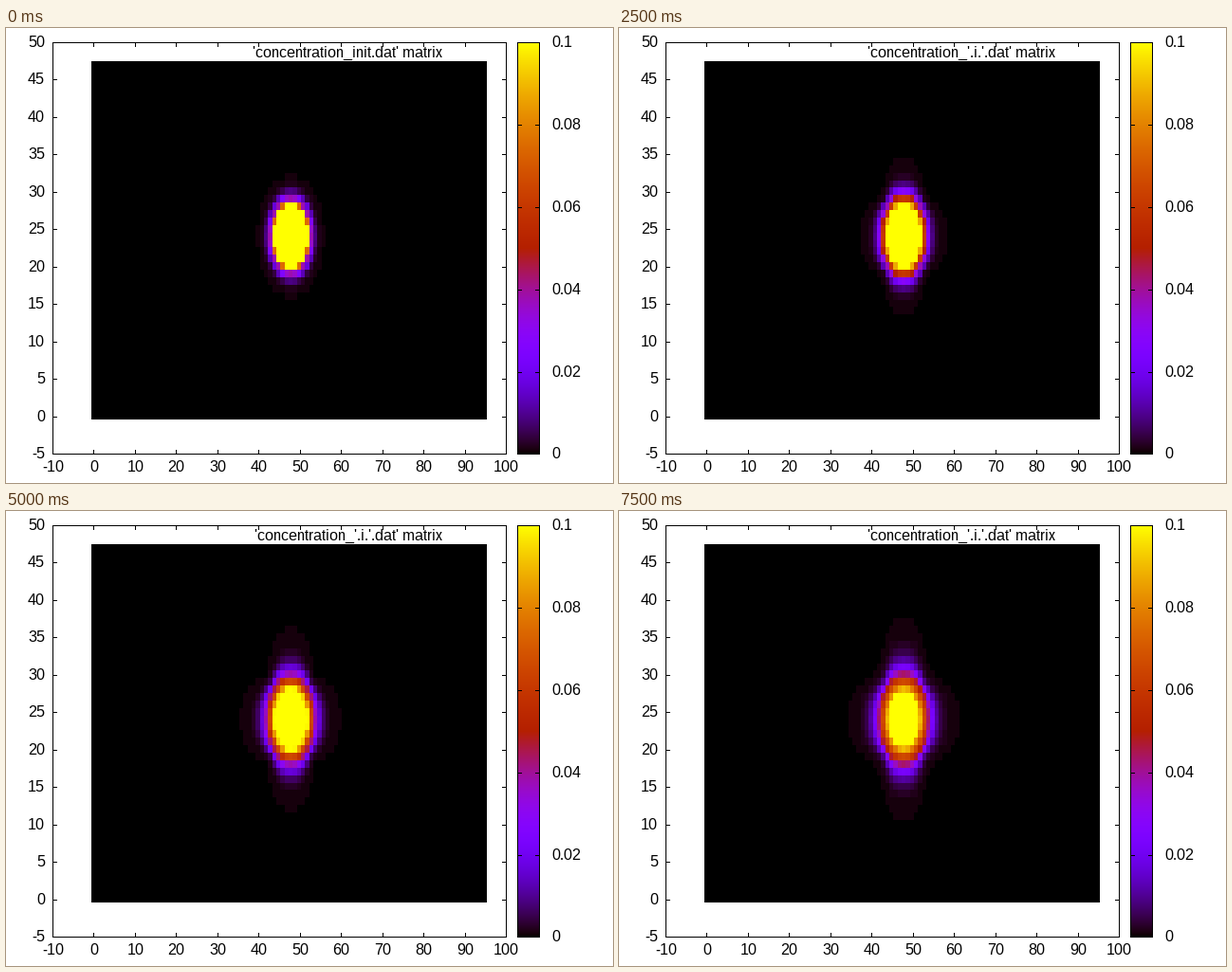
A matplotlib script for the animation above (8 s loop, 640 by 480 pixels).

```python
import math
import numpy as np
import matplotlib.pyplot as plt
from matplotlib.animation import FuncAnimation
from matplotlib.patches import Rectangle

W, H, DPI = 640, 480, 100
LEFT, RIGHT, TOP, BOTTOM = 49, 527, 15, 449     # plot frame
CB_L, CB_R = 539, 562                           # colour box
MX0, MX1, MY0, MY1 = 90, 507, 35, 413           # matrix area
COLS, ROWS, CX, CY = 96, 48, 48, 23
LEVELS = 128
TICK = 5

plt.rcParams["font.family"] = "Liberation Sans"
plt.rcParams["text.hinting"] = "default"
plt.rcParams["text.hinting_factor"] = 1         # whole-pixel advances

fig = plt.figure(figsize=(W / DPI, H / DPI), dpi=DPI, facecolor="white")
ax = fig.add_axes([0, 0, 1, 1])
ax.axis("off")


def palette(g):
    """Black-violet-red-yellow ramp for values from 0 to 1."""
    blue = np.clip(np.sin(2 * np.pi * g), 0, 1)
    return np.stack([np.sqrt(g), g ** 3, blue], axis=-1)


def quantize(v):
    return np.clip(np.floor(v * LEVELS), 0, LEVELS - 1) / (LEVELS - 1)


def cell_index(lo, hi, n):
    """Cell number of every pixel between lo and hi."""
    edges = np.floor(lo + np.arange(n + 1) * (hi - lo) / n)
    return np.searchsorted(edges, np.arange(lo, hi), side="right") - 1


def bar(x, y, w, h):
    ax.add_patch(Rectangle((x, y), w, h, fc="black", lw=0,
                           antialiased=False, zorder=3))


def frame(x0, y0, x1, y1):
    for y in (y0, y1):
        bar(x0, y, x1 - x0 + 1, 1)
    for x in (x0, x1):
        bar(x, y0, 1, y1 - y0 + 1)


def label(x, y, s, ha):
    return ax.text(x, y, s, ha=ha, va="baseline", color="black",
                   fontsize=16 * 72 / DPI, zorder=4)


def side_ticks(x0, x1, y):
    bar(x0, y, TICK, 1)
    bar(x1 - TICK + 1, y, TICK, 1)


def distance(t):
    """Round near the core, drawn out along both axes further away."""
    dx = np.abs(np.arange(COLS) - CX)[None, :]
    dy = np.abs(np.arange(ROWS) - CY)[:, None]
    r = np.hypot(dx, dy)
    star = np.maximum(dx, dy) + np.minimum(dx, dy) ** 2.8 / 24
    return r + np.clip((r - 5) / 3, 0, 1) * min(t / 5, 1) * (star - r)


def field(t):
    """Slowly decaying Gaussian core with a spreading tail."""
    d = distance(t)
    front = 8.1 + 0.625 * t ** 0.8
    edge = 2 - math.log(1 - t / 45)                         # at d = 4
    rim = -math.log(0.038 + 0.028 * (1 - math.exp(-t / 3)))  # at d = 5
    rest = math.log(10 * LEVELS)                            # at the front
    s = np.maximum(d - 5, 0) / (front - 5)
    ease = np.sin(np.pi / 2 * np.minimum(s, 1)) ** 1.4 + np.maximum(s - 1, 0)
    core = edge * (d / 4) ** 2
    ring = edge + (rim - edge) * (d - 4)
    tail = rim + (rest - rim) * ease
    return 10 * np.exp(-np.where(d < 4, core, np.where(d < 5, ring, tail)))


# matrix image
ix = cell_index(MX0, MX1, COLS)
iy = cell_index(MY0, MY1, ROWS)


def picture(t):
    return palette(quantize(field(t)))[np.ix_(iy, ix)]


heat = ax.imshow(picture(0), extent=(MX0, MX1, MY1, MY0), aspect="auto",
                 interpolation="nearest", zorder=1)

# colour box
ramp = palette(np.linspace(1, 0, BOTTOM - TOP))[:, None, :]
ax.imshow(ramp, extent=(CB_L, CB_R, BOTTOM, TOP), aspect="auto",
          interpolation="nearest", zorder=1)
ax.set_xlim(0, W)
ax.set_ylim(H, 0)

# axes
frame(LEFT, TOP, RIGHT, BOTTOM)
frame(CB_L, TOP, CB_R, BOTTOM)
for v in range(-10, 101, 10):
    x = round(LEFT + (v + 10) * (RIGHT - LEFT) / 110)
    bar(x, TOP, 1, TICK)
    bar(x, BOTTOM - TICK + 1, 1, TICK)
    label(x + 0.5, 468, str(v), "center")
for v in range(-5, 51, 5):
    y = round(BOTTOM - (v + 5) * (BOTTOM - TOP) / 55)
    side_ticks(LEFT, RIGHT, y)
    label(41, y + 5, str(v), "right")
for i in range(6):
    y = math.ceil(BOTTOM - i * (BOTTOM - TOP) / 5)
    side_ticks(CB_L, CB_R, y)
    label(575, y + 5, f"{i * 0.02:g}", "left")

title = label(460.5, 31, "", "right")


def update(t):
    name = "'concentration_'.i.'.dat'" if t else "'concentration_init.dat'"
    title.set_text(name + " matrix")
    heat.set_data(picture(t))
    return heat, title


anim = FuncAnimation(fig, update, frames=16, interval=500,
                     repeat=True, repeat_delay=0, blit=False)
plt.show()
```
